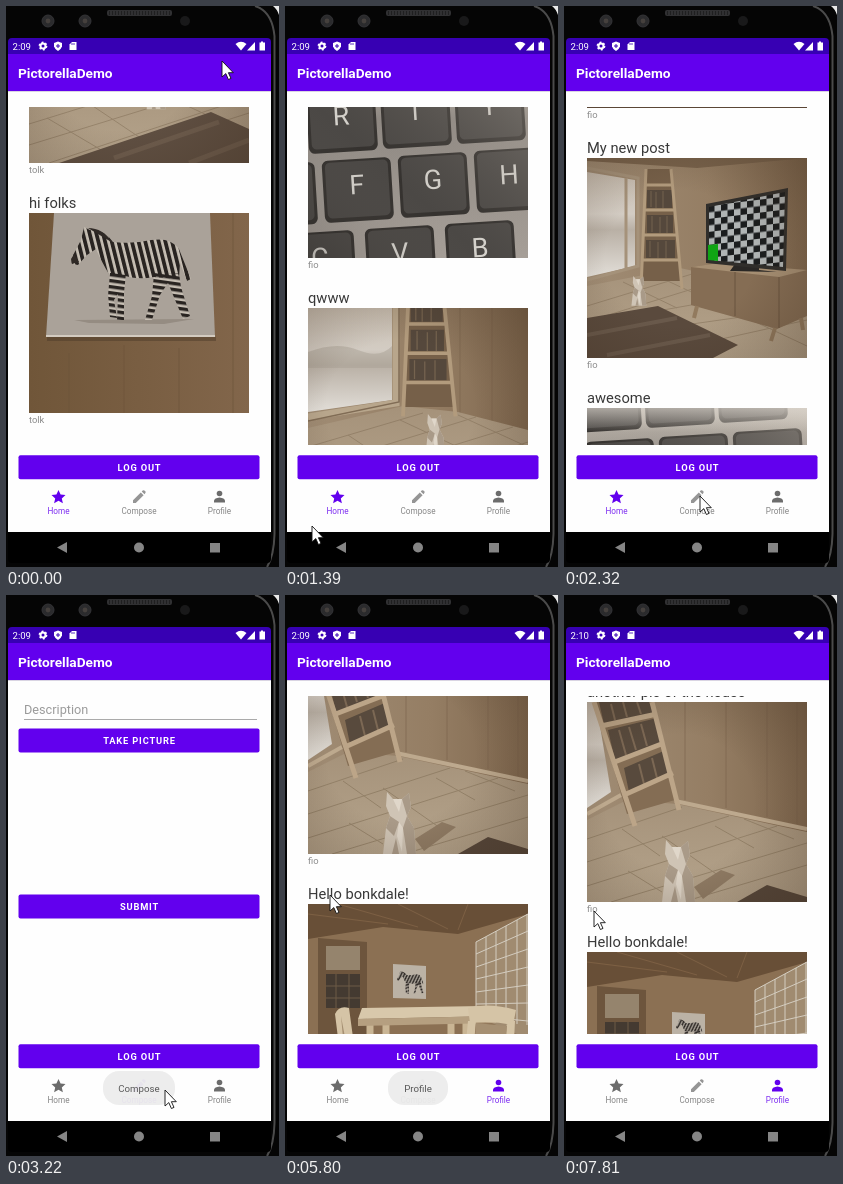
Recreate the animation shown at these times as an HTML page. Size 273x561 px, loop 8000 ms.

```html
<!DOCTYPE html>
<html lang="en">
<head>
<meta charset="utf-8">
<title>Photo feed</title>
<style>
html, body { margin: 0; width: 100%; height: 100%; overflow: hidden; background: #000 }
svg { display: block }
text { font-family: Roboto, Arial, sans-serif }
.title { font-size: 14.7px; fill: #383838 }
.user { font-size: 9.4px; fill: #8c8c8c }
.button rect { fill: #6200ee }
.button text { font-size: 9.3px; font-weight: 600; letter-spacing: .82px; fill: #fff; text-anchor: middle }
.tab { fill: #6c6c6c; font-size: 8.2px; text-anchor: middle }
.tab text { opacity: .82 }
.tab.on { fill: #6200ee }
.cap { font: 27px Roboto, sans-serif; fill: #d5d2cc; text-anchor: middle }
</style>
</head>
<body>
<svg id="stage" width="273" height="561" viewBox="0 0 273 561">
<defs>
  <clipPath id="listBox"><path d="M2 101H265V439H2Z"/></clipPath>
  <linearGradient id="wall"><stop stop-color="#a08c74"/><stop offset=".55" stop-color="#957e64"/><stop offset="1" stop-color="#7f674e"/></linearGradient>
  <linearGradient id="floor" x2="0" y2="1"><stop stop-color="#a5927a"/><stop offset="1" stop-color="#b5a48c"/></linearGradient>
  <linearGradient id="glass" x2="0" y2="1"><stop stop-color="#c8beb1"/><stop offset=".4" stop-color="#d3ccc3"/><stop offset=".55" stop-color="#b9b0a5"/><stop offset="1" stop-color="#e2ded8"/></linearGradient>
  <linearGradient id="wood"><stop stop-color="#705639"/><stop offset="1" stop-color="#82664b"/></linearGradient>
  <linearGradient id="metal" x2="0" y2="1"><stop stop-color="#c4bdb3"/><stop offset=".3" stop-color="#8f8983"/><stop offset="1" stop-color="#a7a099"/></linearGradient>
  <linearGradient id="gloss" x2="0" y2="1"><stop stop-color="#ded8d0" stop-opacity=".65"/><stop offset="1" stop-color="#ded8d0" stop-opacity="0"/></linearGradient>
  <linearGradient id="light" x1="0" y1="1" x2="1" y2="0"><stop stop-color="#1c1815" stop-opacity=".2"/><stop offset=".4" stop-color="#807870" stop-opacity="0"/><stop offset="1" stop-color="#d2c8bc" stop-opacity=".38"/></linearGradient>
  <radialGradient id="shade" cx=".42" cy=".5" r=".75"><stop offset=".45" stop-color="#3c2a1a" stop-opacity="0"/><stop offset="1" stop-color="#3c2a1a" stop-opacity=".32"/></radialGradient>
  <pattern id="checks" width="13" height="13" patternUnits="userSpaceOnUse" patternTransform="translate(121 48) skewY(-7)">
    <path d="M0 0H13V13H0Z" fill="#b0b4b4"/><path d="M0 0H6.5V13H13V6.5H0Z" fill="#1b1d1e"/>
  </pattern>
  <pattern id="bars" width="6.5" height="9" patternUnits="userSpaceOnUse" patternTransform="rotate(-14)"><path d="M0 0H3.8V9H0Z" fill="#292421"/></pattern>
  <pattern id="bands" width="9" height="6" patternUnits="userSpaceOnUse" patternTransform="rotate(8)"><path d="M0 0H9V3.4H0Z" fill="#292421"/></pattern>

  <path id="torso" d="M43 51L42 46 52 27 55 14 61 17Q75 16 84 29 105 31 122 27 142 24 150 36L162 66 158 68 151 50 150 66 125 64Q110 67 96 63L81 63Q72 48 67 36L58 42 49 52Z"/>
  <path id="legs" d="M81 60H97L95 80 95 107 88 107 89 81 85 87 88 105 81 104 79 82ZM125 60H150L152 74 161 103 154 106 144 82 139 70 131 82 123 107 116 107 123 83Z"/>
  <g id="zebra">
    <g fill="#c6beb3"><use href="#torso"/><use href="#legs"/></g>
    <use href="#torso" fill="url(#bars)"/><use href="#legs" fill="url(#bands)"/>
    <path d="M43 51L42 46 45 41 50 49ZM59 15Q74 15 84 30" fill="#302a26"/>
  </g>
  <g id="shelf">
    <path d="M5 0H31L40 112H1Z" fill="#766049"/>
    <path d="M6 21H31V39H6ZM6 46H32V64H6ZM5 71H34V89H5Z" fill="#55483c"/>
    <path d="M10 22V38M15 23V39M22 22V39M11 47V63M19 48V64M26 47V64M9 72V88M17 73V89M25 72V89" stroke="#75634f"/>
    <path d="M5 0L0 120M30 0L41 120M4 16H32M4 41H34M3 66H36M2 91H38" stroke="#b29b7d" stroke-width="3" fill="none"/>
  </g>
  <g id="cat">
    <path d="M5 0L11 7H20L27 1 29 15 25 24 32 36 34 62H1L4 36 8 24 4 14Z" fill="#cfc4b5"/>
    <path d="M27 1L29 15 25 24 20 7ZM25 24L32 36 34 62H25L21 36ZM8 24L17 30 12 44 4 36ZM14 46L17 62H10Z" fill="#a99a88"/>
    <path d="M11 7H20L17 20ZM17 30L21 36 20 60 15 44Z" fill="#e0d7ca"/>
  </g>

  <symbol id="house" viewBox="0 0 220 200">
    <path d="M0 0H220V200H0Z" fill="url(#wall)"/>
    <path d="M98 0V98M139 0V106M180 0V115M210 0V122" stroke="#78614a" opacity=".6"/>
    <path d="M0 0H9L24 90 0 106Z" fill="url(#glass)"/>
    <path d="M0 118L40 98 90 102 220 130V200H0Z" fill="url(#floor)"/>
    <path d="M0 112L34 93M88 99L220 127" fill="none" stroke="#bda98e" stroke-width="4"/>
    <path d="M0 137L95 105M0 160L142 114M0 184L190 124M24 200L220 141M96 200L220 163M35 127L73 154M75 134L135 176M128 124L167 146M157 117L207 137M41 169L75 190" stroke="#86745b" opacity=".65"/>
    <path d="M7 0H65L88 98 40 112Z" fill="#846d54"/>
    <path d="M12 0H62L67 11 17 22ZM21 28L70 16 75 40 28 58ZM37 66L79 48 84 70 42 90Z" fill="#584a3d"/>
    <path d="M24 2L28 18M36 0L40 15M50 0L54 12M32 28L39 53M42 25L49 48M54 22L60 44M52 62L57 82M65 56L70 76" stroke="#7c6854" stroke-width="2"/>
    <path d="M7 0L48 124M65 0L92 108M14 24L70 12M25 61L77 41M37 93L86 71" stroke="#bca588" stroke-width="5" fill="none"/>
    <path d="M107 185L134 168 148 173 116 197Z" fill="#8f7b64"/>
    <use href="#cat" x="74" y="138"/>
    <path d="M150 200L180 183 220 195V200Z" fill="#55463a"/>
    <path d="M0 0H220V200H0Z" fill="url(#shade)"/>
  </symbol>

  <symbol id="dining" viewBox="0 0 220 200">
    <path d="M0 0H220V200H0Z" fill="#8b7053"/>
    <path d="M0 0H220V10L150 30 75 23 0 35Z" fill="#684f37"/>
    <path d="M0 10L80 20M30 0L110 23M90 0L140 25M160 0L150 26" stroke="#7d6044"/>
    <path d="M10 34L59 38V165H10Z" fill="#6d553d"/><path d="M18 42H52V66H18Z" fill="#95846d"/>
    <path d="M18 70H52V104H18Z" fill="#443a31"/><path d="M18 82H52M18 94H52M28 70V104M41 70V104" stroke="#6d5a46"/>
    <path d="M85 60L118 62V95L85 94Z" fill="#bbb2a5"/>
    <use href="#zebra" transform="translate(80 64) scale(.22 .24)"/>
    <path d="M168 38L220 10V135L168 112Z" fill="#a08b70"/>
    <path d="M168 38L220 10M168 50L220 27M168 63L220 45M168 75L220 63M168 88L220 81M168 100L220 99M168 112L220 117M168 38V112M178 33V114M188 27V116M198 22V118M209 16V120M219 10V121" stroke="#d4cdc0" fill="none"/>
    <path d="M0 158L85 145 220 172V200H0Z" fill="#715841"/>
    <path d="M62 116V200M78 116V170M143 116V190M158 114V200" stroke="#c9b594" stroke-width="7"/>
    <path d="M54 104L175 102 188 112 50 115Z" fill="#d8c8ab"/>
    <path d="M50 115L188 112V119L50 122Z" fill="#b59f80"/>
    <path d="M27 110Q31 101 41 104L47 148 66 150 68 160 65 200H58V161L42 163 38 200H29L32 150ZM160 104Q181 98 208 106L205 121Q182 116 162 119ZM160 117H168L165 150 196 152 199 117H207L203 200H195V163L164 160 160 200H152Z" fill="#d5c4a6"/>
    <path d="M33 112L40 149 37 156ZM168 119L199 122 197 151 166 149Z" fill="#a58f72"/>
    <path d="M0 197H220V200H0Z" fill="#5a4636"/>
  </symbol>

  <symbol id="lounge" viewBox="0 0 220 200">
    <path d="M0 0H220V200H0Z" fill="url(#wall)"/>
    <path d="M0 0H220L110 10 0 3Z" fill="#78624b"/>
    <path d="M0 14L48 22V108L0 119Z" fill="url(#glass)"/>
    <path d="M0 10L51 20V108L0 122M39 20V110" stroke="#a5927a" stroke-width="3" fill="none"/>
    <path d="M0 128L93 110 220 138V200H0Z" fill="url(#floor)"/>
    <path d="M0 148L105 116M18 158L128 124M65 154L160 137M105 166L190 154M130 182L220 162M36 124L90 150M70 118L220 188" stroke="#86735b" opacity=".6"/>
    <use href="#shelf" x="54" y="11"/>
    <path d="M104 109L132 105 220 112V158L190 171 104 147Z" fill="#856d54"/>
    <path d="M104 109L132 105 220 112 192 119Z" fill="#a68f73"/>
    <path d="M148 114V158M192 119V170" stroke="#69543f"/>
    <path d="M110 148L107 160M188 170L184 183M214 160L216 172" stroke="#927a5e" stroke-width="4"/>
    <path d="M148 106L172 107V112L190 114 143 113Z" fill="#292725"/>
    <path d="M119 46L201 30 199 113 119 105Z" fill="#302e2b"/>
    <path d="M122 49L198 34 196 109 122 102Z" fill="url(#checks)"/>
    <path d="M121 87L131 86V103L121 102Z" fill="#10a514"/>
    <use href="#cat" transform="translate(44 118) scale(.45 .48)"/>
    <path d="M0 160L71 148 151 187 126 200H0Z" fill="#5a4a3d"/>
    <path d="M0 177L90 160M20 197L123 177" stroke="#79695a" stroke-width="4" opacity=".5"/>
    <path d="M0 0H220V200H0Z" fill="url(#shade)"/>
  </symbol>

  <symbol id="keys" viewBox="0 0 220 200">
    <path d="M0 0H220V200H0Z" fill="url(#metal)"/><g id="caps"></g>
    <path d="M0 0H220V200H0Z" fill="url(#light)"/><path d="M0 0H220V24H0Z" fill="url(#gloss)"/>
  </symbol>

  <symbol id="window" viewBox="0 0 220 200">
    <path d="M0 0H220V200H0Z" fill="url(#wall)"/>
    <path d="M0 0H84V92L0 104Z" fill="url(#glass)"/>
    <path d="M0 44Q28 33 50 42T84 38V60H0Z" fill="#aaa196" opacity=".5"/>
    <path d="M88 0V95L0 109" fill="none" stroke="#b8a68c" stroke-width="7"/>
    <path d="M91 0V94L0 113" fill="none" stroke="#806c55" stroke-width="1.5"/>
    <path d="M152 0V106M184 0V113" stroke="#78614a" opacity=".6"/>
    <path d="M0 120L95 98 150 104 220 122V200H0Z" fill="url(#floor)"/>
    <path d="M0 139L115 105M0 161L168 109M0 182L205 119M20 200L220 134M95 190L220 150M40 127L110 174M92 112L180 153M150 107L220 139M18 155L74 188" stroke="#86735b" opacity=".6"/>
    <use href="#shelf" transform="translate(95 -32) scale(1.28 1.17)"/>
    <use href="#cat" transform="translate(117 106) scale(.58 .65)"/>
    <path d="M30 200L182 149 220 166V200Z" fill="#5f4f42"/>
    <path d="M85 195L190 159M160 200L220 177" stroke="#7b6959" stroke-width="5" opacity=".5"/>
    <path d="M0 0H220V200H0Z" fill="url(#shade)"/>
  </symbol>

  <symbol id="print" viewBox="0 0 220 200">
    <path d="M0 0H220V200H0Z" fill="url(#wood)"/>
    <path d="M18 126H187" stroke="#4e3c2a" stroke-width="4" opacity=".5"/>
    <path d="M25 0H181L186 124H17Z" fill="#aaa299"/><path d="M17 123H186" stroke="#d3cbc0" stroke-width="2"/>
    <path d="M45 107L165 106 135 111 60 110Z" fill="#958c82"/>
    <use href="#zebra"/>
    <path d="M40 140V200M95 132V200M150 135V200M204 0V200" stroke="#6d543a" opacity=".35" stroke-width="2"/>
  </symbol>
</defs>

<path d="M0 0H273V561H0Z" fill="#050505"/>
<path d="M249 0Q266 5 268.5 30V528Q268 550 261 561" fill="none" stroke="#4b4b4b" stroke-width="2"/>
<path d="M267 0H273V9Q271 3 267 0Z" fill="#e8e8e8"/>
<g fill="#2b2b2d" stroke="#343437"><circle cx="42" cy="15" r="6"/><circle cx="79" cy="15" r="6"/></g>
<g fill="#45403d"><circle cx="42" cy="15" r="2.4"/><circle cx="79" cy="15" r="2.4"/></g>
<circle cx="179" cy="15" r="5" fill="#19191a"/>
<rect x="101" y="4" width="65" height="6" rx="2" fill="#303032"/>
<path d="M103 7H164" stroke="#1f1f20" stroke-width="4" stroke-dasharray="1 2"/>

<path d="M2 48V36Q2 32 6 32H261Q265 32 265 36V48Z" fill="#3700b3"/>
<path d="M2 48H265V85H2Z" fill="#6200ee"/>
<path d="M2 85H265V526H2Z" fill="#fefefe"/>
<path d="M2 85.5H265" stroke="#d9d4e2"/>
<path d="M2 526H265V553Q265 557 261 557H6Q2 557 2 553Z" fill="#000"/>
<g fill="#fff">
  <text id="clock" x="6.5" y="43.7" font-size="9.6"></text>
  <circle cx="37" cy="40" r="2.5" fill="none" stroke="#fff" stroke-width="2"/>
  <circle cx="37" cy="40" r="3.7" fill="none" stroke="#fff" stroke-width="1.4" stroke-dasharray="1.9 1.97"/>
  <path d="M52 35.5L56 37V40.5Q55 43.5 52 45 49 43.5 48 40.5V37Z"/><path d="M52 38V42M50 40H54" stroke="#3700b3"/>
  <path d="M66 36H70.5V44H63.5V38.5Z"/><path d="M66 37V39M68 37V39" stroke="#3700b3" stroke-width=".8"/>
  <path d="M229.5 38Q235 33.5 240.5 38L235 44.5Z"/><path d="M249 36V44.5H241Z"/>
  <path d="M255 35.5H257V36.5H259V44.5H253.5V36.5H255Z"/>
  <text x="12" y="72" font-size="13.7" font-weight="600">PictorellaDemo</text>
</g>

<g clip-path="url(#listBox)"><g id="feed"></g></g>
<g id="compose">
  <text x="18" y="119" font-size="12.7" fill="#9b9b9b">Description</text>
  <path d="M18 124.5H251" stroke="#aaa"/>
  <g class="button"><rect x="12.5" y="133.5" width="241" height="24" rx="2"/><text x="133.5" y="149">TAKE PICTURE</text></g>
  <g class="button"><rect x="12.5" y="299.5" width="241" height="24" rx="2"/><text x="133.5" y="315">SUBMIT</text></g>
</g>
<g class="button"><rect x="12.5" y="449.3" width="241" height="24" rx="2"/><text x="133.5" y="464.8">LOG OUT</text></g>

<g class="tab"><path d="M52.5 484L54.6 488.6 59.5 489.1 55.8 492.4 56.9 497.3 52.5 494.7 48.1 497.3 49.2 492.4 45.5 489.1 50.4 488.6Z"/><text x="52.5" y="508">Home</text></g>
<g class="tab"><path d="M127 494.2L134.8 486.4 137.6 489.2 129.8 497H127ZM135.7 485.5L137 484.2Q138 483.8 139.6 485.6 140 486.6 138.5 488.3Z" opacity=".72"/><text x="133" y="508">Compose</text></g>
<g class="tab"><circle cx="213.5" cy="487.5" r="2.8"/><path d="M208 496.5V494.5Q208.5 492 213.5 491.5 218.5 492 219 494.5V496.5Z"/><text x="213.5" y="508">Profile</text></g>
<g id="tip"><rect y="476" height="34" rx="16" fill="#ededed" opacity=".95"/><text x="133" y="496.5" font-size="9.7" fill="#585858" text-anchor="middle"></text></g>

<g fill="#858585"><path d="M51 541.5L61 536V547Z"/><circle cx="133" cy="541.5" r="5"/><path d="M204 537H214V546.5H204Z"/></g>
<path id="cursor" d="M0 0V16L3.8 12.6 6.4 18.5 9 17.4 6.4 11.7H11.3Z" fill="#fff" stroke="#111" stroke-width=".9"/>
</svg>
<script>
const $ = id => document.getElementById(id);
const LOOP = 8000;

const posts = [
  ["another pic of the house", "house", "fio"],
  ["Hello bonkdale!", "dining", "fio"],
  ["My new post", "lounge", "fio"],
  ["awesome", "keys", "fio"],
  ["qwww", "window", "tolk"],
  ["hi folks", "print", "tolk"]
];
$("feed").innerHTML = posts.map(([title, photo, user], i) => `<g transform="translate(23 ${i * 250})">
  <text class="title" y="-5">${title}</text>
  <use href="#${photo}" width="220" height="200"/>
  <text class="user" y="210">${user}</text></g>`).join("");

// Keyboard rows: letters, centre of the first letter, distance between keys
const rows = [["3456", -55, -8, 73], ["ERTY", -41, 63, 74], ["DFGH", -27, 132, 76], ["CVB", 12, 200, 80]];
$("caps").innerHTML = rows.map(([letters, x0, y0, gap]) => [...letters].map((c, i) =>
  `<g transform="translate(${x0 + i * gap} ${y0 - i * 5}) rotate(-3.5)">
  <rect x="-34" y="-26" width="69" height="62" rx="6" fill="#35322f"/>
  <rect x="-31" y="-24" width="63" height="56" rx="5" fill="#4b4845"/>
  <text class="cap" y="9">${c}</text></g>`).join("")).join("");

// The picture is refreshed in bursts: first time, last time, count
const ticks = [[0, 0, 1], [140, 1130, 8], [1250, 2200, 8], [2320, 3220, 8], [3510, 4510, 8],
  [4630, 5530, 8], [5680, 6280, 6], [6430, 6590, 2], [6740, 7690, 7], [7810, 7810, 1]]
  .flatMap(([a, b, n]) => Array.from({ length: n }, (_, i) =>
    Math.floor((a + (b - a) * i / (n - 1 || 1)) / 10) * 10));

const scroll = [[0, -1043], [560, -1043], [1130, -808], [1380, -698], [1700, -500], [2000, -375], [2200, -348],
  [2560, -348], [2570, 127], [5140, 127], [5530, 92], [5920, 45], [6280, 28], [6590, 28], [7300, 90], [7690, 107]];
const pointer = [[0, 216, 55], [140, 222, 50], [280, 238, 41], [420, 150, 100], [560, 20, 175], [1130, 19, 410],
  [1380, 27, 520], [1700, 60, 512], [2320, 136, 490], [2700, 138, 492], [3220, 159, 495], [3510, 168, 497],
  [3800, 213, 496], [4350, 220, 502], [4630, 240, 507], [5140, 90, 366], [5530, 70, 340], [5800, 45, 300],
  [6280, 38, 195], [6590, 36, 200], [7300, 31, 299], [7690, 29, 316], [7810, 30, 316]];
const tipFade = [[0, 0], [2820, 0], [2960, 1], [3860, 1], [3930, 0], [4200, 0], [4360, 1], [6430, 1], [6740, 0]];

function at(keys, t) {
  const i = keys.findIndex(k => k[0] > t);
  if (i < 0) return keys.at(-1).slice(1);
  const a = keys[i - 1], b = keys[i], p = (t - a[0]) / (b[0] - a[0]);
  return a.slice(1).map((v, j) => v + (b[j + 1] - v) * p);
}

const tabs = document.querySelectorAll(".tab");
const [tipBox, tipText] = $("tip").children;

function draw(now) {
  const time = now % LOOP;
  const t = ticks.findLast(k => k <= time);
  const tab = t < 2570 ? 0 : t < 3900 ? 1 : 2;
  tabs.forEach((el, i) => el.classList.toggle("on", i === tab));
  $("compose").style.display = tab === 1 ? "" : "none";
  $("feed").style.display = tab === 0 || t >= 4350 ? "" : "none";
  $("feed").setAttribute("transform", `translate(0 ${Math.round(at(scroll, t)[0])})`);
  $("clock").textContent = t < 7000 ? "2:09" : "2:10";

  const width = tab === 2 ? 60 : 72;
  $("tip").setAttribute("opacity", at(tipFade, t)[0]);
  tipBox.setAttribute("x", 133 - width / 2);
  tipBox.setAttribute("width", width);
  tipText.textContent = tab === 2 ? "Profile" : "Compose";

  $("cursor").setAttribute("transform", `translate(${at(pointer, t).map(Math.round)})`);
  requestAnimationFrame(() => draw(performance.now()));
}
draw(0);
</script>
</body>
</html>
```
